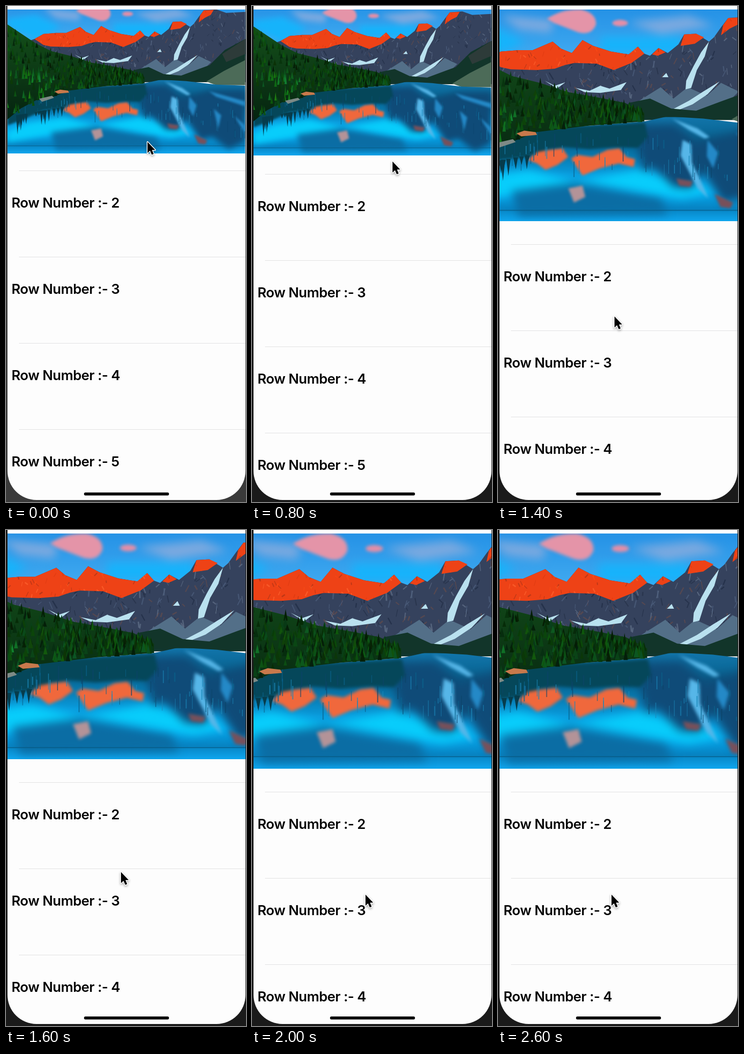
An HTML page that plays this animation: 480x989 px, repeating every 2800 ms.

```html
<!DOCTYPE html>
<html lang="en">
<head>
<meta charset="utf-8">
<title>Stretchy header</title>
<style>
  html, body { margin: 0; width: 100%; height: 100%; overflow: hidden; background: #3a3a3a; }
  #screen { position: absolute; left: 3px; top: 0; width: 475.5px; height: 985px;
    overflow: hidden; background: #fdfdfd; border-radius: 0 0 58px 58px; }
  #photo { position: absolute; left: 0; top: 7px; width: 100%; overflow: hidden; }
  #photo svg { position: absolute; left: 0; bottom: 0; width: 100%; height: max(297px, 100%); }
  #rows { position: absolute; left: 0; top: 0; width: 100%; }
  .row { position: relative; height: 172.1px; }
  .row::before { content: ""; position: absolute; left: 23px; right: 0; top: -.5px; height: 1px; background: #e1e1e2; }
  .row span { position: absolute; left: 8px; top: 47px; white-space: nowrap; color: #050505;
    font: 600 27.5px/34px Inter, "Liberation Sans", sans-serif; letter-spacing: -.5px; }
  #home { position: absolute; left: 153px; top: 969.5px; width: 170px; height: 6px; border-radius: 3px; background: #050505; }
  #cursor { position: absolute; left: 0; top: 0; overflow: visible; filter: drop-shadow(0 2px 2px #0005); }
  .soft { filter: blur(2px); }
  .haze { filter: blur(6px); }
</style>
</head>
<body>
<div id="screen">
  <div id="photo">
    <svg viewBox="3 -3 475 297" preserveAspectRatio="xMidYMax slice">
      <defs>
        <linearGradient id="sky" x2="0" y2="1">
          <stop offset="0" stop-color="#2592e6"/><stop offset=".6" stop-color="#3fa9f0"/><stop offset="1" stop-color="#08a9f8"/>
        </linearGradient>
        <linearGradient id="lake" x2="0" y2="1">
          <stop offset="0" stop-color="#1276ac"/><stop offset=".25" stop-color="#07608c"/>
          <stop offset=".55" stop-color="#0a9bdd"/><stop offset=".72" stop-color="#07a8ee"/>
          <stop offset=".88" stop-color="#0783c2"/><stop offset="1" stop-color="#0fa6ee"/>
        </linearGradient>
        <linearGradient id="wood" x2="0" y2="1">
          <stop offset="0" stop-color="#14501a"/><stop offset="1" stop-color="#052310"/>
        </linearGradient>
        <clipPath id="rockClip"><path id="ridge" d="M3 84L57 66 75 56 100 54 120 54 148 42 160 52 175 58 190 40 205 48 230 56 255 60 268 49 277 59 285 62 297 51 310 58 325 46 333 32 350 31 368 42 375 36 385 22 395 9 420 7 440 14 478 12V152H3Z"/></clipPath>
        <clipPath id="glowClip"><path id="glow" d="M57 66L75 56 100 54 120 54 148 42 160 52 175 58 190 40 205 48 230 56 255 60 268 49 277 59 259 72 234 82 210 73 179 72 165 75 151 80 125 82 89 81 75 78Z M288 60L297 51 307 57 296 62Z M328 48L333 32 350 31 361 36 348 45Z M385 33L388 19 395 9 415 8 409 18 397 24Z"/></clipPath>
        <clipPath id="lakeClip"><path d="M3 148H478V294H3Z"/></clipPath>
      </defs>
      <path fill="url(#sky)" d="M3-3H478V100H3Z"/>
      <g class="haze">
        <path fill="#16b3fb" d="M3 25L60 18 110 42 60 68 3 40Z M215 35H330V58H215Z"/>
        <path fill="#7ba9df" d="M75 5L150 12 145 30 100 25Z M255 15L340 6 375 20 300 32Z"/>
      </g>
      <g class="soft">
        <path fill="#e494a8" d="M140 10Q160-4 188-3 210 2 209 18 203 34 184 29 168 23 150 16Z"/>
        <ellipse fill="#e58ea6" cx="243" cy="16" rx="11" ry="4.5"/>
      </g>
      <use href="#ridge" fill="#35425d"/>
      <g id="rocks" clip-path="url(#rockClip)"></g>
      <use href="#glow" fill="#ee4216"/>
      <g id="embers" clip-path="url(#glowClip)"></g>
      <path fill="#536f88" d="M265 128L300 106 318 122 338 106 365 118 385 100 410 112 375 146 280 146Z"/>
      <g fill="#b9e1ef">
        <path d="M368 42L362 63 351 82 343 107 335 109 336 97 346 77 357 57Z"/>
        <path d="M383 98L366 116 345 130 320 140 317 137 340 125 360 112Z"/>
        <path d="M137 97L151 104 166 99 154 108Z M180 107L200 111 215 104 228 108 252 99 244 110 215 114 193 113Z M302 92L308 86 311 92Z"/>
      </g>
      <path fill="#12352a" d="M255 128L285 122 315 136 350 139 385 126 407 118 437 88 478 66V152H255Z"/>
      <path fill="#4c6b58" d="M400 151L435 130 478 108V158H420Z"/>
      <path fill="#2d3b39" d="M432 96L478 66V96L440 112Z"/>
      <g clip-path="url(#lakeClip)">
        <path fill="url(#lake)" d="M3 205L125 166 278 154 310 147 360 150 420 157 478 159V294H3Z"/>
        <g class="haze">
          <path fill="#08cdfb" d="M3 250L45 232 115 222 145 230 180 238 270 222 300 232 340 240 375 252 330 262 200 240 80 258 3 272Z"/>
          <path fill="#0b6da4" d="M90 252L180 240 300 262 310 284 100 287Z"/>
          <path fill="#0f4b78" d="M262 160L320 158 350 182 410 168 478 168V270L445 285 412 262 388 268 360 225 342 248 318 246 290 218 275 224Z"/>
        </g>
        <g class="soft">
          <path fill="#05475a" d="M3 200L130 164 278 156 282 176 268 191 235 190 200 193 165 190 140 193 112 204 75 208 35 226 3 238Z"/>
          <path fill="#f0683c" d="M113 208L126 197 144 194 162 192 170 204 155 215 138 222 126 213Z M174 206L183 201 204 204 225 194 242 192 252 204 264 207 262 218 241 213 214 220 190 230Z"/>
          <path fill="#b39398" d="M170 248L190 244 194 260 178 268Z"/>
          <path fill="#56b6e8" d="M316 150L352 164 369 176 362 178 340 166Z M331 180L343 186 344 212 355 234 367 262 352 248 338 221 328 202Z"/>
          <path fill="#2489c7" d="M366 180L381 198 374 220 365 203Z M405 170L478 190V200L420 181Z M415 205L430 218 424 244Z M455 218L478 238V254Z"/>
          <path fill="#78505a" d="M322 234L345 238 342 246 326 244Z M376 256L402 268 398 276 384 274Z"/>
        </g>
        <g id="ripples"></g>
        <path fill="#08577f" opacity=".6" d="M3 278H478V279.5H3Z"/>
      </g>
      <path fill="url(#wood)" d="M3 37L30 55 60 75 90 90 130 100 170 113 215 121 250 128 277 142V154L200 160 125 169 95 181 60 188 30 204 3 226Z"/>
      <g id="trees"></g>
      <path fill="#c8794c" d="M97 171L108 167 124 169 126 173 104 175Z"/>
      <path fill="#7d8a86" d="M66 185L92 179 96 183 72 191Z"/>
    </svg>
  </div>
  <div id="rows"></div>
  <div id="home"></div>
</div>
<svg id="cursor" width="20" height="30">
  <path d="M0 0V22L5 17.5 8.5 25.5 12.3 24 9 16H15.3Z" stroke="#fff" stroke-width="3" paint-order="stroke" stroke-linejoin="round"/>
</svg>
<script>
const $ = id => document.getElementById(id);

let seed = 11;
const rnd = (a, b) => {
  seed = (seed * 16807) % 2147483647;
  return a + (b - a) * seed / 2147483647;
};
const pick = list => list[Math.floor(rnd(0, list.length))];
const fill = (id, n, make) => { $(id).innerHTML = Array.from({ length: n }, make).join(''); };
const stroke = (x, y, dx, dy, color, w) =>
  `<path d="M${x} ${y}l${dx} ${dy}" stroke="${color}" stroke-width="${w}" opacity=".65"/>`;

fill('rocks', 420, () => stroke(rnd(50, 478), rnd(10, 140), rnd(-6, 6), rnd(3, 10),
  pick(['#1e2a42', '#253047', '#4f6180', '#66758d', '#664c4b']), rnd(.7, 2)));
fill('embers', 170, () => stroke(rnd(57, 415), rnd(8, 82), rnd(-4, 5), rnd(2, 7),
  pick(['#a83418', '#ff6531', '#d93a12', '#ff4d14']), rnd(.7, 1.8)));
fill('ripples', 110, () => {
  const x = rnd(3, 478);
  return stroke(x, rnd(165, 215) + Math.max(0, x - 280) * .2, 0, rnd(5, 22),
    pick(['#0a648e', '#0c4469', '#1b88ba']), rnd(.6, 1.6));
});

// Conifers fill the band between the hill's crest and its shore.
const crest = x => x < 90 ? 37 + (x - 3) * .62 : 91 + (x - 90) * .255;
const shore = x => x < 125 ? 224 - (x - 3) * .45 : 169 - (x - 125) * .095;
const conifer = (x, y, w, h, color) =>
  `<path fill="${color}" d="M${x} ${y - h}l${w} ${h}h${-2 * w}z"/>`;
const trees = Array.from({ length: 430 }, () => {
  const x = rnd(3, 274), k = rnd(0, 1);
  const y = crest(x) + 5 + (shore(x) - crest(x) - 5) * k;
  const near = x < 95 && k > .45;
  const color = `hsl(${rnd(112, 140)} 75% ${near ? rnd(11, 29) : rnd(6, 20)}%)`;
  return { y, shape: conifer(x, y, rnd(2, 3.5), rnd(8, near ? 22 : 15), color) };
});
trees.sort((a, b) => a.y - b.y);
const mirrored = Array.from({ length: 22 }, () => {
  const x = rnd(3, 115);
  return conifer(x, 222 - x * .18, 3, -rnd(8, 50 - x * .25), '#063c4c');
});
$('trees').innerHTML = mirrored.join('') + trees.map(t => t.shape).join('');

$('rows').innerHTML = [2, 3, 4, 5].map(n => `<div class="row"><span>Row Number :- ${n}</span></div>`).join('');

// Each step: pointer x, pointer y, top of the list.
const STEP = 200, REST = 328;
const steps = [
  [283, 271, 328], [283, 271, 328], [282, 270, 328], [282, 273, 328],
  [281, 310, 335], [270, 402, 377], [248, 522, 431], [233, 619, 475],
  [230, 682, 503], [228, 720, 518], [227, 727, 522], [227, 727, 522],
  [227, 727, 522], [227, 727, 522]
];

function draw(now) {
  const i = Math.floor(now / STEP) % steps.length;
  const [x, y, top] = steps[i];
  const gap = 34 + Math.min(12, (top - REST) / 2);
  $('photo').style.height = top - gap - 7 + 'px';
  $('rows').style.transform = `translateY(${top}px)`;
  $('cursor').style.transform = `translate(${x}px, ${y}px)`;
  document.body.style.background = i < 4 ? '#3a3a3a' : '#1a1a1a';
}

const start = performance.now();
function tick() {
  draw(performance.now() - start);
  requestAnimationFrame(tick);
}
tick();
</script>
</body>
</html>
```
